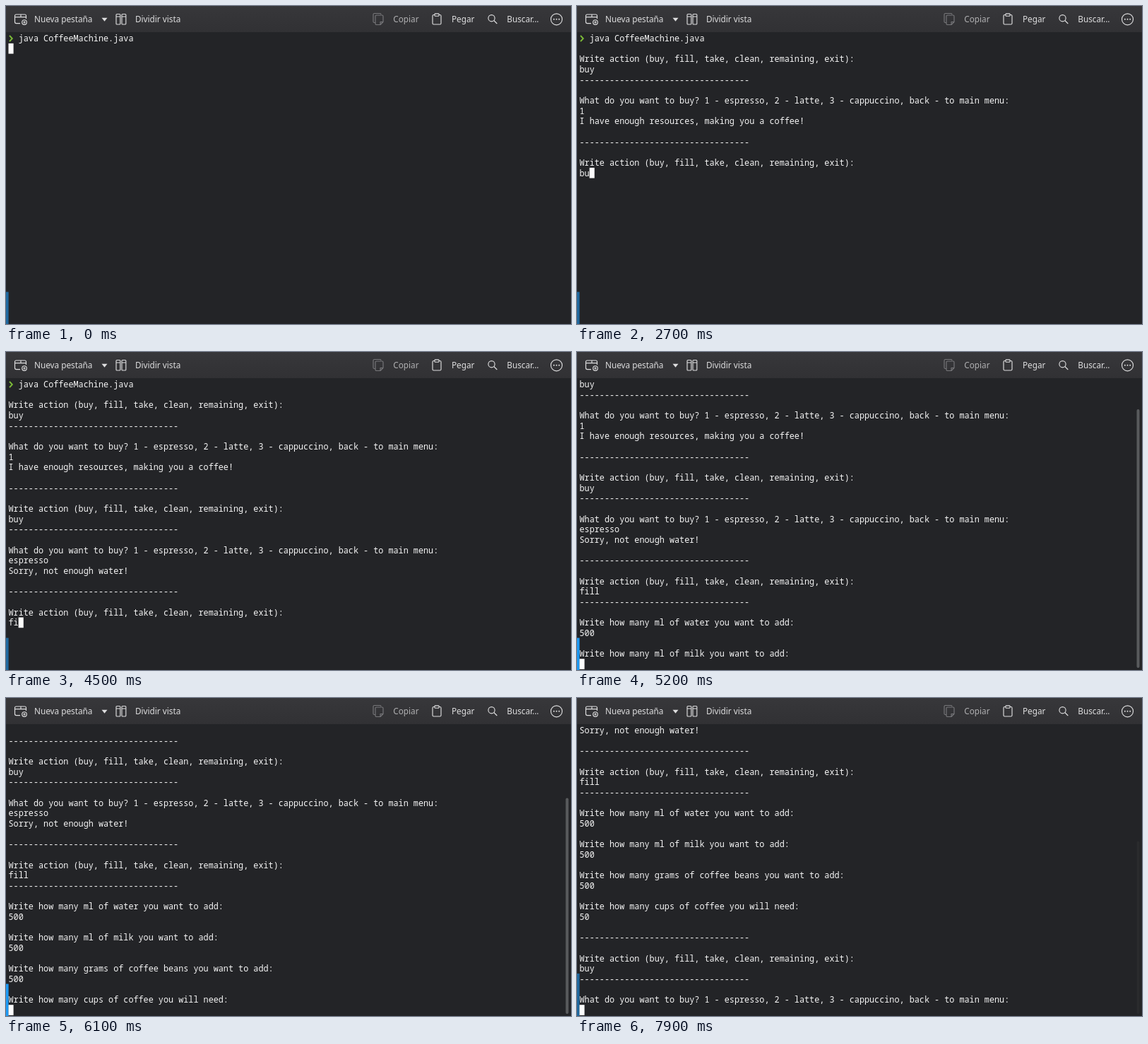
An HTML page for the animation above (8000 ms loop, 800 px wide and 450 px high).

```html
<!DOCTYPE html>
<html lang="es">
<head>
<meta charset="utf-8">
<title>Coffee machine terminal</title>
<style>
  html, body { margin: 0; width: 100%; height: 100%; overflow: hidden; background: #232427; }
  svg { display: block; width: 800px; height: 450px; }
  .label { font: 11.75px "Noto Sans", sans-serif; fill: #dededf; }
  .label.off { fill: #b0b0b2; }
  .icon { fill: none; stroke: #dededf; stroke-width: 1.15; stroke-linejoin: round; }
  .icon.off { stroke: #77777a; }
  .solid { fill: #dededf; stroke: none; }
  #rows text { font: 11.8px "Noto Sans Mono", monospace; fill: #f6f6f6; white-space: pre;
    font-variant-ligatures: none; }
</style>
</head>
<body>
<svg viewBox="0 0 800 450" xmlns="http://www.w3.org/2000/svg">
  <defs>
    <linearGradient id="header" x2="0" y2="1">
      <stop stop-color="#37373a"/><stop offset="1" stop-color="#313134"/>
    </linearGradient>
  </defs>
  <rect width="800" height="450" fill="#232427"/>
  <rect width="800" height="37" fill="url(#header)"/>

  <g class="icon">
    <path d="M20 24.6H14.5a2 2 0 0 1-2-2V14a2 2 0 0 1 2-2H26.500a2 2 0 0 1 2 2V18M12.500 15.600H28.500M21 12.500V15.500"/>
    <circle cx="26" cy="23" r="3.300"/>
    <path d="M26 21.300V24.700M24.300 23H27.700"/>
    <path class="solid" d="M135.500 16.800H143.500L139.500 21.800Z"/>
    <rect x="156" y="11.500" width="5.800" height="14.500" rx="1"/>
    <rect x="164" y="11.500" width="5.800" height="14.500" rx="1"/>
    <path d="M156 15H161.800M164 15H169.800"/>
    <path d="M607 12.500H605.500a1.500 1.500 0 0 0-1.500 1.500V24.500a1.500 1.500 0 0 0 1.500 1.500H614.500a1.500 1.500 0 0 0 1.500-1.500V14a1.500 1.500 0 0 0-1.500-1.500H613"/>
    <rect x="607" y="10.800" width="6" height="3.400" rx=".8"/>
    <circle cx="687.500" cy="17.200" r="4.600"/>
    <path d="M690.800 20.500L695.300 25"/>
    <circle cx="779.500" cy="18.800" r="8"/>
  </g>
  <g class="solid">
    <circle cx="775.800" cy="18.800" r="1"/><circle cx="779.500" cy="18.800" r="1"/><circle cx="783.200" cy="18.800" r="1"/>
  </g>
  <path class="icon off" d="M522.500 23.500H521.500a1.500 1.500 0 0 1-1.500-1.500V12a1.500 1.500 0 0 1 1.500-1.500H529.500a1.500 1.500 0 0 1 1.500 1.500M524.500 13H532.500a1.500 1.500 0 0 1 1.500 1.500V22.500L530 26.500H524.500a1.500 1.500 0 0 1-1.500-1.500V14.500a1.500 1.500 0 0 1 1.500-1.500M530 26.500V22.500H534"/>
  <g class="label">
    <text x="40" y="23.300">Nueva pestaña</text>
    <text x="183" y="23.300">Dividir vista</text>
    <text class="label off" x="548.300" y="23.300">Copiar</text>
    <text x="631" y="23.300">Pegar</text>
    <text x="709.300" y="23.300">Buscar...</text>
  </g>

  <rect id="marker" width="3.600"/>
  <rect id="thumb" x="792.500" width="4" rx="2" fill="#595b5d"/>
  <path id="prompt" d="M5 41.800L8.800 46L5 50.200" fill="none" stroke="#7cbb38" stroke-width="1.900"/>
  <g id="rows"></g>
  <rect id="cursor" width="7.100" height="14.700" fill="#fcfcfc"/>
</svg>

<script>
const LOOP = 8000, STEP = 100, ROWS = 28;
const LEFT = 3.5, TOP = 38.2, CELL_W = 7.08, CELL_H = 14.667, BASELINE = 11.7;

const rule = "-".repeat(34);
const action = `\n${rule}\n\nWrite action (buy, fill, take, clean, remaining, exit):\n`;
const drinks = `\n${rule}\n\nWhat do you want to buy? 1 - espresso, 2 - latte, 3 - cappuccino, back - to main menu:\n`;
const ask = what => `\n\nWrite how many ${what}:\n`;

// Each entry appends text to the terminal at its time in ms.
const output = [
  [0, "  java CoffeeMachine.java\n"],
  [100, action.slice(rule.length + 2)],
  [300, "b"], [400, "u"], [500, "y"], [900, drinks],
  [1500, "1"],
  [1600, "\nI have enough resources, making you a coffee!\n" + action],
  [2700, "bu"], [2800, "y"], [3000, drinks],
  [3200, "e"], [3300, "s"], [3500, "p"], [3600, "re"], [3700, "s"], [3800, "so"],
  [4100, "\nSorry, not enough water!\n" + action],
  [4500, "fi"], [4600, "ll"],
  [4700, `\n${rule}` + ask("ml of water you want to add")],
  [4900, "50"], [5000, "0"], [5200, ask("ml of milk you want to add")],
  [5400, "50"], [5500, "0"], [5600, ask("grams of coffee beans you want to add")],
  [5900, "50"], [6000, "0"], [6100, ask("cups of coffee you will need")],
  [6400, "5"], [6700, "0"], [6800, "\n" + action],
  [7200, "b"], [7400, "u"], [7500, "y"], [7600, drinks]
];

const el = id => document.getElementById(id);
const set = (node, attrs) => {
  for (const name in attrs) node.setAttribute(name, attrs[name]);
};
const rowTop = row => TOP + row * CELL_H;

const rows = Array.from({ length: ROWS }, (_, i) => {
  const text = document.createElementNS("http://www.w3.org/2000/svg", "text");
  set(text, { x: LEFT, y: rowTop(i) + BASELINE });
  return el("rows").appendChild(text);
});

function terminalAt(time) {
  let buffer = "", scroll = 0, scrolledBy = 3, scrolledAt = -LOOP;
  for (const [at, text] of output) {
    if (at > time) break;
    buffer += text;
    const next = Math.max(0, buffer.split("\n").length - ROWS);
    if (next > scroll) {
      scrolledBy = next - scroll;
      scrolledAt = at;
      scroll = next;
    }
  }
  return { lines: buffer.split("\n"), scroll, scrolledBy, age: time - scrolledAt };
}

function render(time) {
  const { lines, scroll, scrolledBy, age } = terminalAt(time);
  rows.forEach((row, i) => {
    const text = lines[i + scroll] || "";
    if (row.textContent !== text) row.textContent = text;
  });

  const last = lines.length - 1;
  set(el("cursor"), { x: LEFT + lines[last].length * CELL_W, y: rowTop(last - scroll) });
  set(el("prompt"), { opacity: scroll ? 0 : 1 });

  const markerTop = rowTop(ROWS - scrolledBy) - 0.3;
  set(el("marker"), { y: markerTop, height: 450 - markerTop, fill: age < 250 ? "#1d99f3" : "#1f689f" });

  const thumbTop = 41 + 413 * scroll / (scroll + ROWS);
  set(el("thumb"), {
    y: thumbTop, height: 447 - thumbTop,
    opacity: scroll ? Math.max(0.12, 1 - age / 340) : 0
  });
}

const start = performance.now();
function tick() {
  const time = (performance.now() - start) % LOOP;
  render(Math.floor(time / STEP) * STEP);
  requestAnimationFrame(tick);
}
tick();
</script>
</body>
</html>
```
